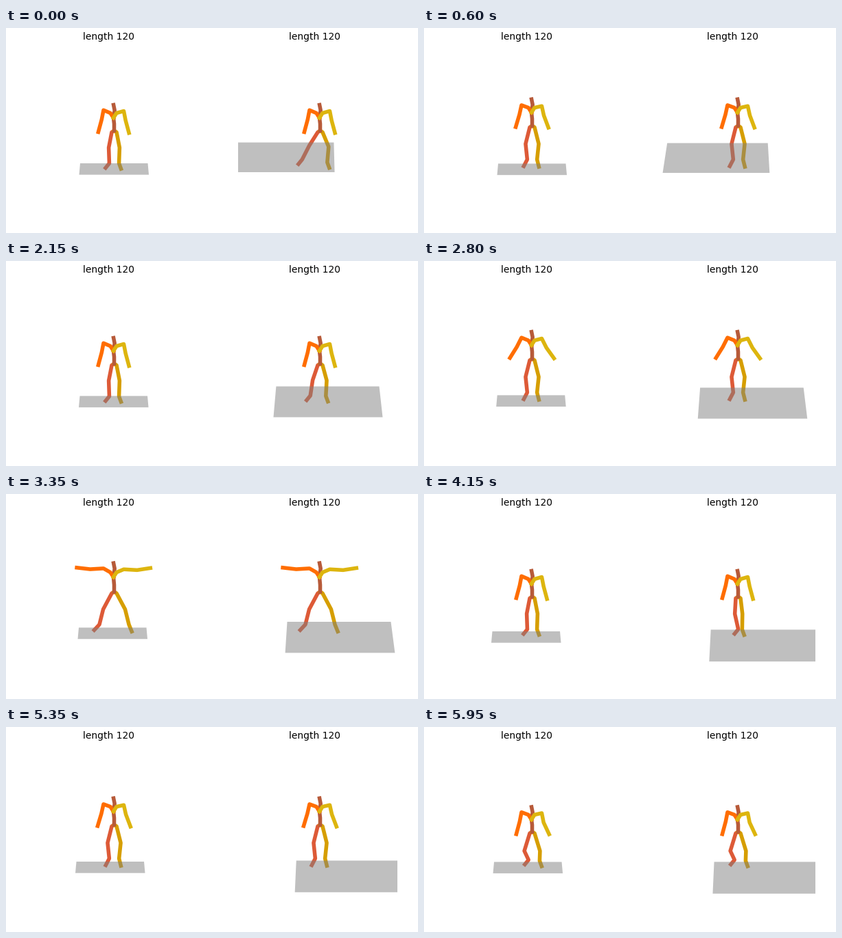
Write a matplotlib script that moves like this. It is 600 by 300 pixels and loops after 6 s.

```python
import numpy as np
import matplotlib.pyplot as plt
from matplotlib.animation import FuncAnimation
from matplotlib.patches import Polygon, Rectangle

FRAMES, STEP = 120, 50
RIGHT, LEFT = -1, 1
COLORS = ["#DD5A37", "#D69E00", "#B75A39", "#FF6D00", "#DDB50E"]

# Jumping jacks: take-off, arms at the top, landing (ms), reach of the arms.
JUMPS = [(450, 900, 1150, 0.75), (2600, 3100, 3500, 1), (5200, 5650, 5950, 0.85)]

# Floor drift: x anchor and far edge at a few times.
DRIFT = [0, 650, 1150, 2150, 3350, 4150, 5350, 6000]
FLOOR_L = ([106, 106, 107, 105.5, 104, 97.5, 100.5, 100],
           [197.5, 198, 193.5, 197, 195, 200.5, 196.5, 197])
FLOOR_R = ([400.3, 427, 439, 468.5, 486, 496, 501, 501],
           [167, 168, 170, 183, 186.5, 198, 195, 197])


def ramp(t, start, end):
    u = np.clip((t - start) / (end - start), 0, 1)
    return u * u * (3 - 2 * u)


def pulse(t, start, full, fade, end):
    return ramp(t, start, full) * (1 - ramp(t, fade, end))


def weights(t):
    """How much the body is off the ground, landing, arms up, legs apart."""
    total = np.zeros(4)
    for start, top, land, reach in JUMPS:
        total += (pulse(t, start, start + 150, land - 150, land),
                  pulse(t, land - 130, land, land, land + 250),
                  reach * pulse(t, start + 130, top, top + 80, land),
                  reach * pulse(t, start + 250, top, land - 140, land))
    return total


def limb(start, side, *bones):
    """Chain of bones given as (degrees outward from straight down, length)."""
    pts = [np.array(start, float)]
    for angle, size in bones:
        a = np.radians(angle)
        pts.append(pts[-1] + size * np.array([side * np.sin(a), np.cos(a)]))
    return pts


def leg(side, hip, hop, dip, split, stride):
    right = side == RIGHT
    thigh = 11 + 3 * hop + 6 * dip + 14 * split + (22 if right else 12) * stride
    shin = -2 - 4 * hop - (23 if right else 0) * dip + 20 * split
    shin += (30 if right else -3) * stride
    foot = (39 if right else 20) * (1 - 0.3 * hop + 0.4 * split)
    top = hip + np.array([3.5 * side, 2.3])
    return [hip] + limb(top, side, (thigh, 23 + 2 * hop + 4 * dip + 1.5 * split),
                        (shin, 23 - 8.5 * dip), (foot, 8.5 + 2.5 * hop))


def arm(side, hip, chest, hop, dip, lift):
    right = side == RIGHT
    shoulder = hip + ((-15.5, -30) if right else (14, -28.7))
    shoulder += (0, 1.5 * dip - 9 * lift)
    flare = 0 if right else (1 - lift) * (10 * dip + 4 * hop)
    reach = limb(shoulder, side, (11 + 167 * lift, 14 + 6 * min(1, 2 * lift)),
                 (15 + flare + 180 * lift, 19 + 3 * lift * lift))
    return [chest, chest + (4.5 * side, -7)] + reach


def body(t, walks):
    hop, dip, lift, split = weights(t)
    sway = 0.35 * np.cos(2 * np.pi * (t - 2150) / 800)
    stride = walks * (sway * (1 - hop) * (1 - dip) + 1.1 * (1 - ramp(t, 0, 450)))
    hip = np.array([157, 149.7 - 7.2 * hop + 3 * dip])
    head = hip + (-0.9, -37.7 - 7 * lift - hop + 1.5 * dip)
    neck = head + (1.6, 8)
    chest = np.array([156, neck[1] + 0.37 * (hip[1] - neck[1])])
    return [leg(RIGHT, hip, hop, dip, split, stride),
            leg(LEFT, hip, hop, dip, split, stride),
            [hip, hip + (0, -10), chest, neck, head],
            arm(RIGHT, hip, chest, hop, dip, lift),
            arm(LEFT, hip, chest, hop, dip, lift)]


def floor_left(x, y):
    low = y + 16.7
    return [(x + 1.5, y), (x + 100, y), (x + 101.5, low), (x, low)]


def floor_right(x, y):
    """Edges converge towards x = 459."""
    low = 210.5 + (y - 167) * 1.1
    near = 156 + (low - 213) * 0.2
    far = 147 + (y - 170) * 0.24
    top = 459 + (x - 459) * far / near
    return [(top - far / 2, y), (top + far / 2, y),
            (x + near / 2, low), (x - near / 2, low)]


fig = plt.figure(figsize=(6, 3), dpi=100, facecolor="white")
ax = fig.add_axes([0, 0, 1, 1])
ax.set(xlim=(-0.5, 599.5), ylim=(299.5, -0.5))
ax.axis("off")


class Panel:
    def __init__(self, left, walks, track, shape):
        self.left, self.walks = left, walks
        self.track, self.shape = track, shape
        ax.text(left + 149.5, 16.5, "length 120", fontsize=10, ha="center",
                va="baseline", family="DejaVu Sans")
        self.lines = [ax.plot([], [], color=c, lw=4)[0] for c in COLORS]
        self.floor = Polygon(np.zeros((4, 2)), fc=(0.5, 0.5, 0.5, 0.5), lw=0, zorder=5)
        ax.add_patch(self.floor)
        self.floor.set_clip_path(
            Rectangle((left + 37.5, 0), 232, 300, transform=ax.transData))

    def draw(self, t):
        for line, chain in zip(self.lines, body(t, self.walks)):
            x, y = np.array(chain).T
            line.set_data(x + self.left, y)
        self.floor.set_xy(self.shape(*(np.interp(t, DRIFT, v) for v in self.track)))
        return [*self.lines, self.floor]


panels = [Panel(0, 0, FLOOR_L, floor_left), Panel(300, 1, FLOOR_R, floor_right)]


def update(i):
    return [artist for panel in panels for artist in panel.draw(i * STEP)]


anim = FuncAnimation(fig, update, frames=FRAMES, interval=STEP,
                     repeat=True, repeat_delay=0, blit=False)
plt.show()
```
